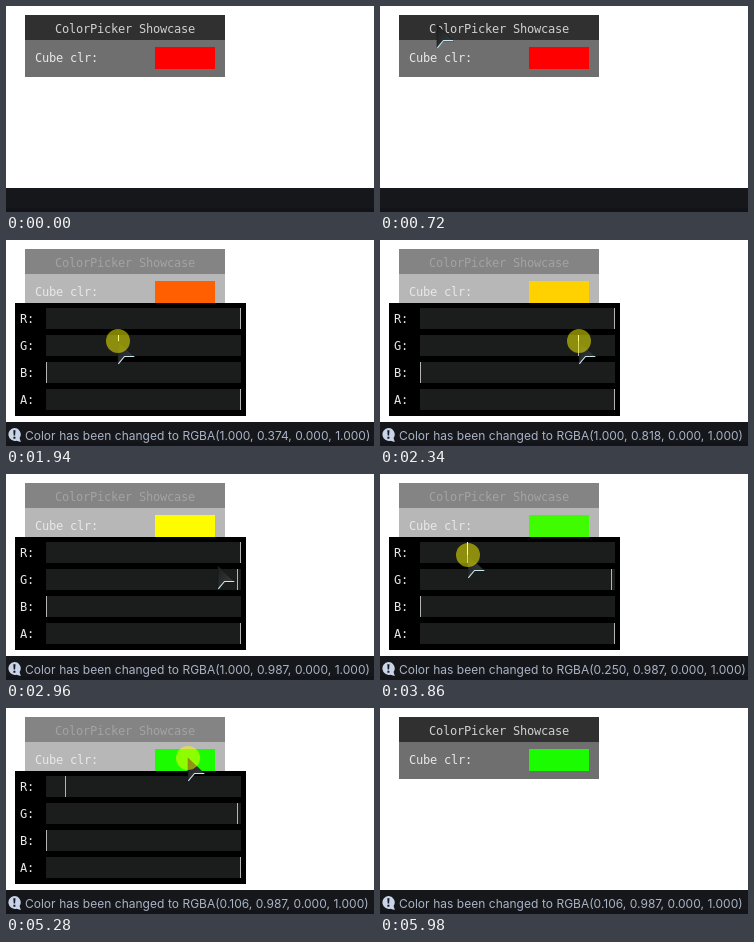
An HTML page that plays this animation: 368 by 206 pixels, repeating every 6.48 s.

```html
<!DOCTYPE html>
<html lang="en">
<head>
<meta charset="utf-8">
<title>Color picker</title>
<style>
  html, body { margin: 0; width: 100%; height: 100%; overflow: hidden; background: #fff; }
  svg { display: block; width: 368px; height: 206px; }
  text { white-space: pre; }
  .mono { font: 12px "DejaVu Sans Mono", monospace; letter-spacing: -0.224px; fill: #e8e8e8; }
  .log { font: 12px Inter, sans-serif; word-spacing: .18px; fill: #a9b4c6; }
  #bar { fill: #303030; }
  #body { fill: #6f6f6f; }
  #title { fill: #d0d0d0; }
  .dim #bar { fill: #848484; }
  .dim #body { fill: #b7b7b7; }
  .dim #title { fill: #a3a3a3; }
</style>
</head>
<body>
<svg viewBox="0 0 368 206">
  <defs>
    <linearGradient id="steel" x1="0" y1="0" x2="1" y2="1">
      <stop offset="0" stop-color="#1c1e1f"/>
      <stop offset="1" stop-color="#3c3f40"/>
    </linearGradient>
  </defs>

  <g id="panel">
    <rect id="bar" x="19" y="9" width="200" height="25"/>
    <rect id="body" x="19" y="34" width="200" height="37"/>
    <text id="title" class="mono" x="49" y="27">ColorPicker Showcase</text>
    <text class="mono" x="29" y="56">Cube clr:</text>
    <rect id="swatch" x="149" y="41" width="60" height="22"/>
  </g>

  <g id="popup">
    <rect x="9" y="63" width="231" height="113"/>
  </g>

  <rect y="182" width="368" height="24" fill="#16171b"/>
  <rect y="202" width="368" height="4" fill="#13131a"/>
  <g id="status">
    <path d="M8.3 188a6.4 6.4 0 0 1 5.3 10l1.2 4-4.4-1.2A6.5 6.5 0 1 1 8.3 188z" fill="#c9d4e8"/>
    <path d="M7.3 190.3h2.2l-.4 5.2h-1.4zM7.4 196.8h2v2h-2z" fill="#16171b"/>
    <text id="message" class="log" x="19" y="200"></text>
  </g>

  <g id="pointer">
    <path d="M0 0V23L6.5 15.8H16.5z" fill="url(#steel)" stroke="#151515" stroke-width=".6"/>
    <path d="M.3 22.8L6.5 15.5H16.3" fill="none" stroke="#c8e8f0" stroke-width="1.1"/>
    <circle id="press" r="12" fill="#ff0" fill-opacity=".5"/>
  </g>
</svg>
<script>
const LOOP = 6480, LEAD = 300, LAST = 56;
const OPEN = 7, CLOSE = 50;
const G_DRAG = [13, 23], R_DRAG = [28, 43];

// Stops of the pointer, which eases from one to the next.
const STOPS = [
  { at: 0, x: 334, y: 62 },
  { at: 4, x: 57, y: 19 },
  { at: 6, x: 174, y: 53 },
  { at: 13, x: 80, y: 101 },
  { at: 23, x: 232.46, y: 101 },
  { at: 28, x: 202.4, y: 87 },
  { at: 35, x: 88.75, y: 81 },
  { at: 43, x: 60.67, y: 81 },
  { at: 49, x: 182, y: 50 },
  { at: 55, x: 362, y: 39 }
];

const $ = id => document.getElementById(id);
const show = (id, on) => $(id).setAttribute("visibility", on ? "visible" : "hidden");
const within = (i, [from, to]) => i > from && i <= to;
const smooth = k => k * k * (3 - 2 * k);

function add(parent, tag, attrs, text = "") {
  const el = document.createElementNS("http://www.w3.org/2000/svg", tag);
  for (const k in attrs) el.setAttribute(k, attrs[k]);
  el.textContent = text;
  return parent.appendChild(el);
}

const marks = [..."RGBA"].map((name, n) => {
  const y = 68 + 27 * n;
  add($("popup"), "text", { class: "mono", x: 14, y: y + 15 }, name + ":");
  add($("popup"), "rect", { x: 40, y, width: 195, height: 21, fill: "#1b1c1c" });
  return add($("popup"), "rect", { y, width: 1, height: 21 });
});

// Steps last 100 ms, but four of them, twelve apart, last 120 ms.
const stepStart = i => LEAD + 100 * i + 20 * Math.min(4, Math.floor((i + 8) / 12));

function stepAt(t) {
  let i = -1;
  while (i < LAST && stepStart(i + 1) <= t) i++;
  return i;
}

function pointerAt(i) {
  const n = Math.max(1, STOPS.findIndex(s => s.at >= i));
  const a = STOPS[n - 1], b = STOPS[n] ;
  const k = smooth((i - a.at) / (b.at - a.at));
  return { x: a.x + (b.x - a.x) * k, y: a.y + (b.y - a.y) * k };
}

const dragged = (i, [from, to], idle) =>
  i > from ? (pointerAt(Math.min(i, to)).x - 40) / 195 : idle;

function draw(i) {
  const rgba = [dragged(i, R_DRAG, 1), dragged(i, G_DRAG, 0), 0, 1];
  const active = [within(i, R_DRAG), within(i, G_DRAG)];
  const open = i >= OPEN && i < CLOSE;
  const moving = i >= 0 && i < LAST;

  $("panel").setAttribute("class", open ? "dim" : "");
  $("swatch").setAttribute("fill", `rgb(${rgba.slice(0, 3).map(v => Math.round(v * 255))})`);
  show("popup", open);
  marks.forEach((m, n) => {
    m.setAttribute("x", Math.max(40, Math.floor(39.1 + 195 * rgba[n])));
    m.setAttribute("fill", active[n] ? "#fff" : "#b4b4b4");
  });

  show("status", i > G_DRAG[0]);
  $("message").textContent =
    `Color has been changed to RGBA(${rgba.map(v => v.toFixed(3)).join(", ")})`;

  show("pointer", moving);
  show("press", moving && (active.includes(true) || i === OPEN - 1 || i === CLOSE - 1));
  if (moving) {
    const { x, y } = pointerAt(i);
    $("pointer").setAttribute("transform", `translate(${Math.floor(x)} ${Math.round(y)})`);
  }
}

let shown = null;
function tick() {
  const i = stepAt(performance.now() % LOOP);
  if (i !== shown) draw(shown = i);
  requestAnimationFrame(tick);
}
tick();
</script>
</body>
</html>
```
